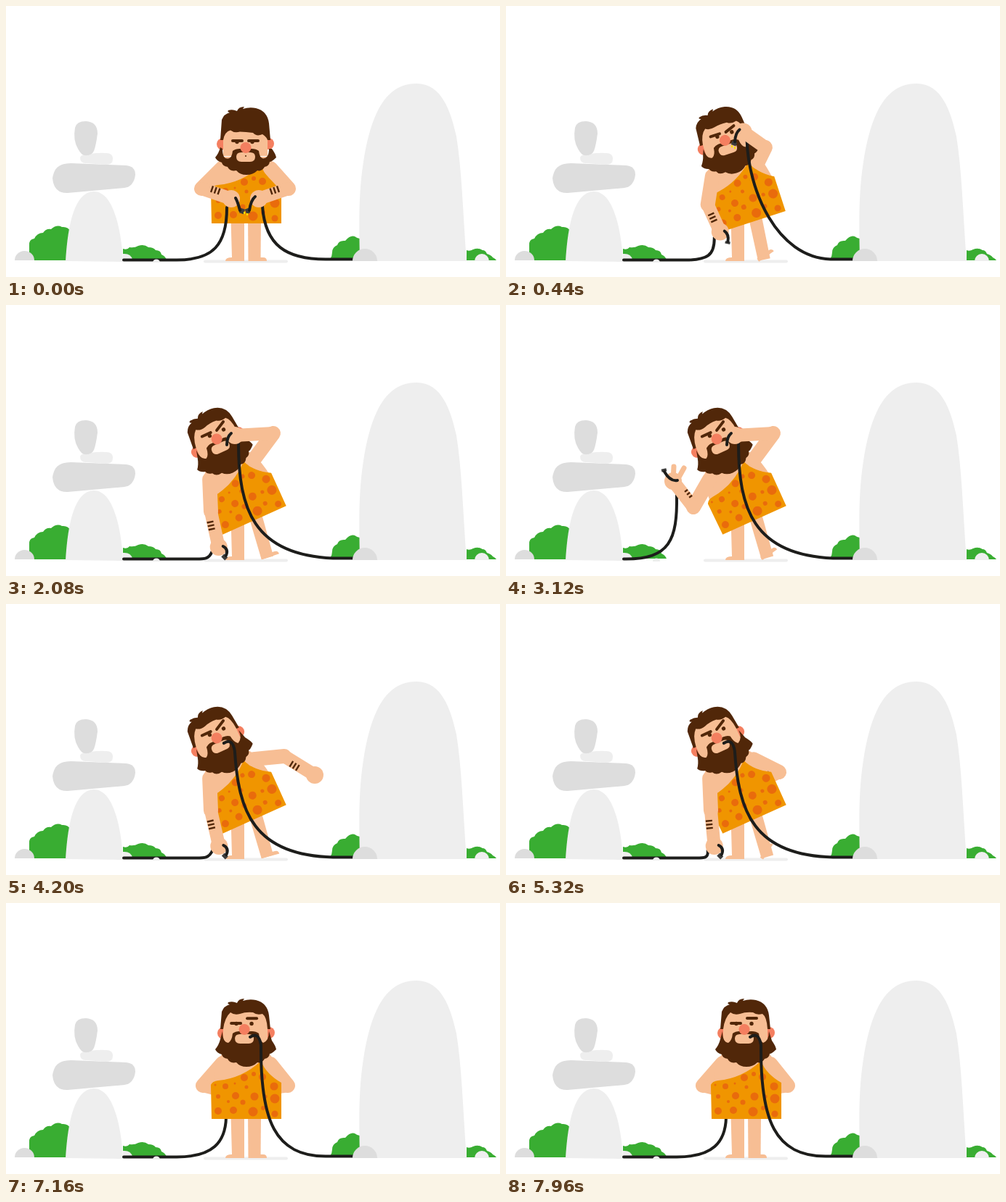
An HTML page that plays this animation: 680x374 px, repeating every 8000 ms.

```html
<!DOCTYPE html>
<html lang="en">
<head>
<meta charset="utf-8">
<title>Caveman with cables</title>
<style>
  html, body { margin: 0; width: 100%; height: 100%; overflow: hidden; background: #fff; }
  svg { display: block; width: 100vw; height: 100vh; }
  .bush { fill: #39ad32; }
  .light { fill: #eee; }
  .grey { fill: #ddd; }
  .skin { fill: #f7be94; }
  .limb { fill: none; stroke: #f7be94; stroke-linecap: round; stroke-linejoin: round; }
  .hair { fill: #512709; }
  .mark { fill: none; stroke: #512709; stroke-width: 2.4; }
  .brow { fill: none; stroke: #512709; stroke-width: 4; stroke-linecap: round; }
  .pink { fill: #f47f60; }
  .tunic { fill: #f09500; }
  .spot { fill: #e96b0c; }
  .cable { fill: none; stroke: #1d1d1b; stroke-width: 4; stroke-linecap: round; }
  .plug { fill: none; stroke: #3c3c3b; stroke-width: 7; }
</style>
</head>
<body>
<svg viewBox="0 0 680 374">
  <path class="bush" d="M32 351V331Q31 322 39 321Q43 313 51 313Q55 307 62 308Q70 301 77 305Q85 304 89 311V351Z"/>
  <path class="grey" d="M12 351A13.5 13 0 0 1 39 351Z"/>
  <path class="bush" d="M161 350V335Q167 337 170 333Q177 334 182 331Q190 328 196 333Q203 333 206 337Q213 337 214 343Q219 345 221 350Z"/>
  <path class="light" d="M82 352C85 300 95 256 121 256C148 256 159 310 161 353Z"/>
  <path class="grey" d="M64 238Q66 221 80 218Q85 217 90 217L165 220Q178 221 178 233Q176 249 163 251L85 258Q66 259 64 238"/>
  <path class="light" d="M102 209Q103 205 112 205Q125 202 138 203Q147 203 147 211Q147 219 138 219L110 217Q102 217 102 209"/>
  <path class="grey" d="M95 168Q97 159 110 159Q126 160 126 176Q124 192 121 200Q118 207 108 206Q104 206 99 197Q92 185 95 168"/>
  <path class="light" d="M161 342Q172 341 174 350H161Z"/>
  <path class="bush" d="M446 350Q449 345 449 340Q449 333 456 330Q458 323 467 324Q474 316 480 318Q484 321 487 321V350Z"/>
  <path class="light" d="M487 352C486 300 485 260 492 215C502 150 522 107 565 107C600 107 612 145 620 180C628 230 629 290 634 352Z"/>
  <path class="bush" d="M634 351V337Q638 339 643 336Q650 333 656 337Q660 337 662 342Q668 344 670 347Q674 349 675 351Z"/>
  <path class="light" d="M645 352A10 10 0 0 1 665 352Z"/>
  <rect class="light" x="272" y="350.5" width="116" height="4" rx="2"/>
  <g id="figure"></g>
  <path class="light" d="M202 354A5 4.5 0 0 1 212 354Z"/>
  <path class="grey" d="M477 352A17 17 0 0 1 511 352Z"/>
</svg>
<script>
const LOOP = 8000, STEP = 40;
const figure = document.getElementById('figure');

const path = (cls, d, extra = '') => `<path class="${cls}" d="${d}" ${extra}/>`;
const dot = (cls, x, y, r) => `<circle class="${cls}" cx="${x}" cy="${y}" r="${r}"/>`;
const group = (transform, ...parts) => `<g transform="${transform}">${parts.join('')}</g>`;

// keys: [time, values]; eased in between, held outside
function track(t, keys) {
  const i = keys.findIndex(k => k[0] > t);
  if (i === 0) return keys[0][1];
  if (i < 0) return keys[keys.length - 1][1];
  const [t0, a] = keys[i - 1], [t1, b] = keys[i];
  const u = (t - t0) / (t1 - t0), e = u * u * (3 - 2 * u);
  return a.map((v, n) => v + (b[n] - v) * e);
}

// elbow, hand, fingers, band offset, tip control, tip end, plug direction, cable shape
const leftPose = {
  hold: [269, 252, 310, 266, 0, -4, 9, 4, 12, 16, 6, 2, 235, 285, 304, 330, 304, 278],
  down: [282, 285, 290, 334, 0, 4, 14, 3, 10, 12, -4, 4, 255, 272, 279, 352, 281, 340],
  lift: [258, 279, 230, 243, 1, 8, -4, 1, -12, -13, -1, -4, 165, 225, 236, 325, 235, 262],
  back: [271, 252, 310, 262, 0, -4, 9, 4, 12, 16, 6, 2, 235, 285, 302, 330, 303, 296]
};
const leftKeys = [[120, leftPose.hold], [640, leftPose.down], [2560, leftPose.down],
  [2920, leftPose.lift], [3440, leftPose.lift], [3880, leftPose.down],
  [5960, leftPose.down], [6320, leftPose.back]];

// elbow, hand, band offset
const rightPose = {
  hold: [389, 252, 348, 266, 4],
  up: [341, 167, 316, 128, 20],
  mouth: [368, 177, 315, 180, 20],
  fling: [385, 172, 392, 135, 12],
  out: [383, 210, 425, 236, 4],
  hip: [376, 232, 348, 246, 4],
  back: [388, 252, 350, 258, 4]
};
const rightKeys = [[120, rightPose.hold], [640, rightPose.up], [1360, rightPose.up],
  [1700, rightPose.mouth], [3400, rightPose.mouth], [3600, rightPose.fling],
  [3900, rightPose.out], [4320, rightPose.out], [4800, rightPose.hip],
  [5960, rightPose.hip], [6320, rightPose.back]];

// two controls and the point where the cable lies flat
const ropeKeys = [[120, [357, 330, 385, 349.5, 440]], [640, [322, 215, 365, 345, 450]],
  [1360, [322, 215, 365, 345, 450]], [1700, [320, 280, 340, 345, 450]],
  [3400, [320, 280, 340, 345, 450]], [3700, [320, 285, 340, 347, 450]],
  [5960, [320, 285, 340, 347, 450]], [6320, [350, 300, 370, 349.5, 440]]];

// left brow x, y; right brow x, y, tilt; pupil shift; face shift
const calm = [0, 0, 0, 0, 0, 0, 0], frown = [1, -2, 1, -5, 3.5, 5, 0], doubt = [0, 1, 0, -6, 0, 1, -2];
const faceKeys = [[160, calm], [600, frown], [5960, frown], [6280, calm], [6900, calm], [7200, doubt]];

const spots = [[292, 267, 3], [302, 253, 4], [316, 266, 5], [306, 274, 2], [313, 286, 5],
  [292, 287, 5], [328, 241, 5], [331, 254, 2.5], [341, 236, 3], [326, 275, 3.5],
  [342, 267, 5.5], [340, 288, 6.5], [353, 240, 5], [354, 283, 3], [357, 267, 2.5],
  [369, 253, 5.5], [370, 270, 6.5], [370, 291, 4.5], [315, 249, 1.5], [288, 251, 1.5]];

function bands(ex, ey, hx, hy, offset) {
  const dx = hx - ex, dy = hy - ey, len = Math.hypot(dx, dy) || 1;
  const lo = Math.max(-8.5, offset - 4.5), hi = Math.min(8.5, offset + 4.5);
  if (lo >= hi) return '';
  const at = (along, side) =>
    `${ex + (dx * along - dy * side) / len} ${ey + (dy * along + dx * side) / len}`;
  return path('mark', [14, 19, 24].map(a => `M${at(a, lo)}L${at(a, hi)}`).join(''));
}

const upperArm = (s, ex, ey) => path('limb', `M${s}L${ex} ${ey}`, 'stroke-width="20"');
const foreArm = (ex, ey, hx, hy, offset) =>
  path('limb', `M${ex} ${ey}L${hx} ${hy}`, 'stroke-width="18"') +
  dot('skin', hx, hy, 12) + bands(ex, ey, hx, hy, offset);

function head(p, t) {
  const [lx, ly, rx, ry, tilt, look, turn] = track(t, faceKeys);
  const h = 17 * p, m = 13 * p;
  const hair = `M295 ${174 + 4 * p}L297 150Q300 142 308 140Q304 139 306 137Q312 135 318 138
    Q320 132 328 132L326 135Q335 132 344 134Q360 138 362 155L364 ${174 + 4 * p}H360
    Q359 ${157 + h} 353 ${153 + h}Q345 ${155 + h * 1.1} 340 ${151 + h}Q330 ${150 + h} 322 ${153 + h * .8}
    Q314 ${155 + h * .8} 309 ${151 + h * .8}Q301 ${158 + h / 2} 299 ${174 + 4 * p}Z`;
  const beard = `M298 ${177 + m}Q298 ${192 + m} 306 ${193 + m * .8}Q311 ${190 + m} 312 ${180 + m}
    Q318 ${175 + m} 330 ${178 + m}Q342 ${175 + m} 348 ${180 + m}Q349 ${190 + m} 354 ${193 + m * .8}
    Q362 ${190 + m} 362 ${177 + m}L366 190Q371 197 372 202Q366 208 363 208Q362 214 356 215
    Q352 222 346 220Q340 226 331 226Q322 226 317 220Q308 222 305 215Q298 214 297 209
    Q290 207 288 202Q293 196 295 188Z`;
  return group(`translate(0 ${5 * p})`,
    dot('pink', 298 - turn / 2, 179.5 + 4 * p, 8), dot('pink', 361 - turn / 2, 179 + 4 * p, 8),
    path('skin', 'M299 150H360V200H299Z'),
    path('hair', beard), path('hair', hair),
    group(`translate(${turn} ${14 * p})`,
      dot('hair', 318 + look, 166.5, 2.7), dot('hair', 339 + look, 166.5, 2.7),
      path('brow', `M${312 + lx} ${165 + ly}h13`),
      path('brow', `M${334 + rx} ${165 + ry + tilt}l13 ${-2 * tilt}`),
      path('skin', 'M317 187Q317 181 324 181H336Q343 181 343 187Q343 194 336 194H324Q317 194 317 187'),
      p > .5 ? dot('hair', 330, 186, 1) : '',
      t >= 760 && t < 1440 ? '<ellipse cx="320" cy="181.5" rx="5" ry="2.8" fill="#e30613"/>' : '',
      dot('pink', 330, 174.5, 7.5)));
}

function legs(lean, tap) {
  return path('skin', 'M309.5 294H328V352H302Q302 347 311 347Z') +
    group(`translate(${3 * lean} ${-lean}) rotate(${-16 * lean} 342 298)`,
      path('skin', 'M333 290H351L350.5 352H333.5Z'),
      group(`rotate(${tap} 337 351)`, path('skin', 'M334 347H354Q359 347 359 352H334Z')));
}

function draw(t) {
  const [lean, p] = track(t, [[120, [0, 1]], [600, [1, 0]], [5960, [1, 0]], [6300, [0, 0]]]);
  const angle = -24.4 * lean, cos = Math.cos(angle * Math.PI / 180), sin = Math.sin(angle * Math.PI / 180);
  const shiftX = 11 * lean, shiftY = 2 * p - lean;
  const body = `translate(${shiftX} ${shiftY}) rotate(${angle} 331 298)`;
  const onBody = (x, y) => [331 + shiftX + (x - 331) * cos - (y - 298) * sin,
    298 + shiftY + (x - 331) * sin + (y - 298) * cos];

  const [lex, ley, lhx0, lhy, fingers, lband, cx, cy, ex, ey, px, py, flat, c1, c2, c2y, endX, endY] = track(t, leftKeys);
  const [rex, rey, rhx, rhy, rband] = track(t, rightKeys);
  const rope = track(t, ropeKeys);
  const sway = lean * (1 - fingers) * Math.sin((t - 1280) / 2240 * 2 * Math.PI);
  const lhx = lhx0 + 3.5 * sway;
  const leftBehind = t >= 6140, rightBehind = t >= 4600, bitten = t >= 3420;

  const leftCable = path('cable',
    `M162 350.5H${flat}C${c1} 350.5 ${c2} ${c2y} ${endX + 3.5 * sway} ${endY}`);
  const leftTip = path('plug', `M${lhx + ex} ${lhy + ey}l${px} ${py}`) +
    path('cable', `M${lhx + 6} ${lhy - 1}Q${lhx + cx} ${lhy + cy} ${lhx + ex} ${lhy + ey}`);
  const spread = fingers > .05 ? path('limb',
    `M${lhx} ${lhy}l1 ${-20 * fingers}M${lhx + 5} ${lhy}l${10 * fingers} ${-18 * fingers}`,
    'stroke-width="7"') : '';
  const leftArm = leftCable + upperArm(onBody(298, 221), lex, ley) +
    foreArm(lex, ley, lhx, lhy, lband) + spread + leftTip;

  const rightUpper = upperArm(onBody(364, 222), rex, rey);
  const rightFore = foreArm(rex, rey, rhx, rhy, rband);

  let start;
  if (bitten) {
    const [mx, my] = onBody(336, 185);
    start = `M${mx} ${my}Q${mx + 12} ${my - 8} ${mx + 15} ${my + 11}`;
  } else start = `M${rhx + 5} ${rhy + 11}`;
  const rightCable = path('cable',
    `${start}C${rope[0]} ${rope[1]} ${rope[2]} ${rope[3]} ${rope[4]} 349.5H478`);
  const tx = rhx - 11 - 2 * p, ty = rhy + 13 + 3 * p, qx = -1 - 4 * p, qy = 6 - 4 * p;
  const plug = t < 1500 ? path('plug', `M${tx} ${ty}l${qx} ${qy}`) +
    path('', `M${tx + qx - 2} ${ty + qy}v3m4 -1v3`, 'stroke="#f6e000" stroke-width="2"') : '';
  const rightTip = bitten ? '' : plug +
    path('cable', `M${rhx - 5} ${rhy - 3}Q${rhx - 11} ${rhy + 2} ${tx} ${ty}`);

  figure.innerHTML = [
    legs(lean, lean * (-20 + 22 * sway)),
    leftBehind ? leftArm : '',
    rightBehind ? rightUpper + rightFore : '',
    group(body,
      path('skin', 'M300 206H360Q370 212 376 248L331 262L286 250Q288 216 300 206Z'),
      path('tunic', 'M282 251Q284 246 292 245Q325 242 351 218Q358 236 379 248V298H283Z'),
      spots.map(s => dot('spot', ...s)).join('')),
    leftBehind ? '' : leftArm,
    rightBehind ? '' : rightUpper,
    group(body, head(p, t)),
    rightCable,
    rightBehind ? '' : rightFore,
    rightTip
  ].join('');
}

const origin = performance.now();
function tick() {
  const t = (performance.now() - origin) % LOOP;
  draw(Math.floor(t / STEP) * STEP);
  requestAnimationFrame(tick);
}
tick();
</script>
</body>
</html>
```
